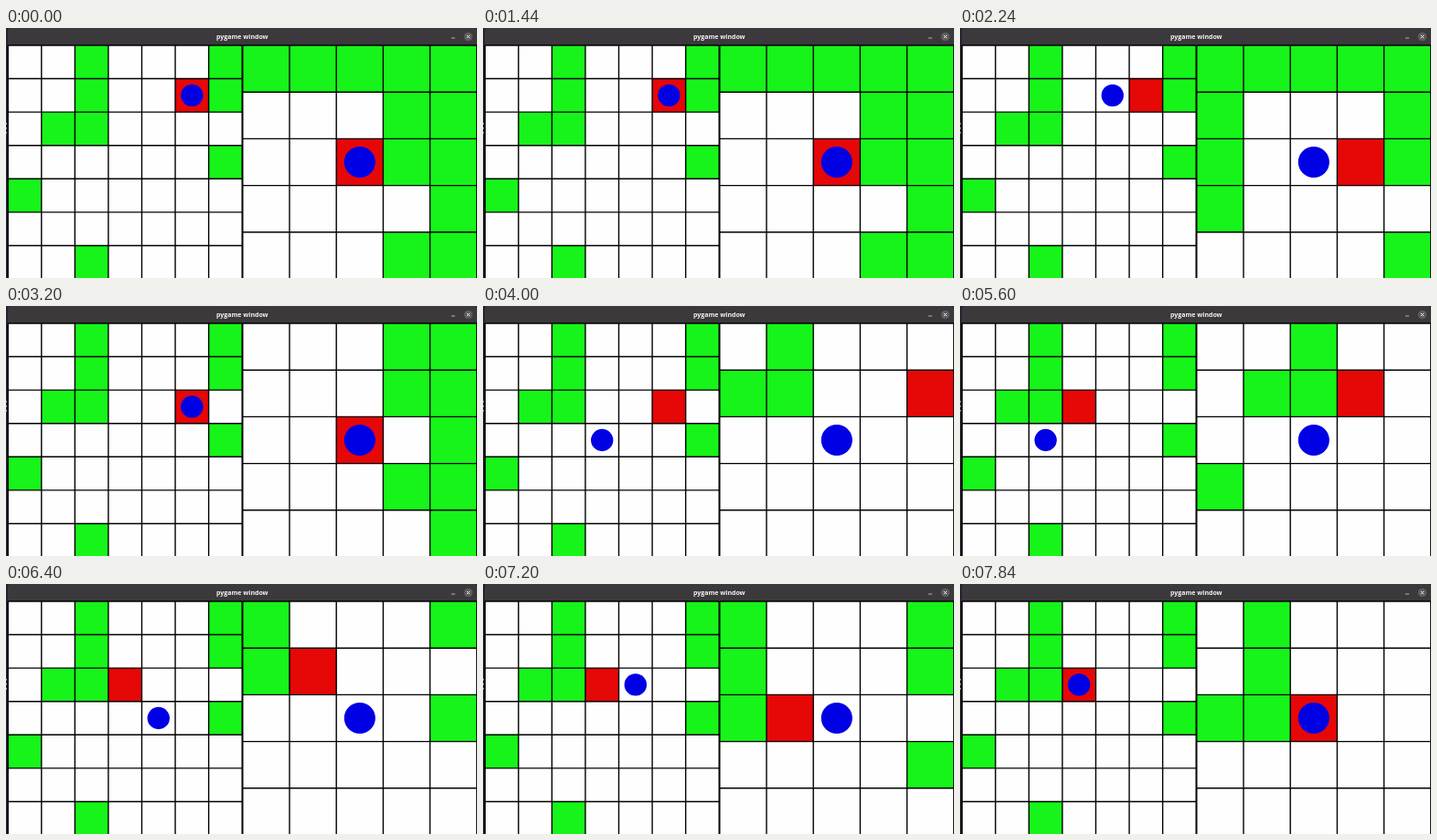
Write an HTML page with a canvas that moves like this. It is 515x274 px and loops after 8000 ms.

```html
<!DOCTYPE html>
<html lang="en">
<head>
<meta charset="utf-8">
<title>pygame window</title>
<style>
html, body { margin: 0; width: 100%; height: 100%; overflow: hidden; background: #2b2030; }
canvas { display: block; }
</style>
</head>
<body>
<canvas id="stage" width="515" height="274"></canvas>
<script>
const ctx = document.getElementById('stage').getContext('2d');
const LOOP = 8000;
const SIZE = 7;      // cells per side of the world
const VIEW = 5;      // cells per side of the agent's view
const PANEL = 256;
const TOP = 19;
const MAP_X = 2.2;
const VIEW_X = 258.8;
const COLORS = { wall: '#16f41a', goal: '#e60707', agent: '#0000e4', floor: '#fefefe' };

const walls = new Set(['2,0', '6,0', '2,1', '6,1', '1,2', '2,2', '6,3', '0,4', '2,6']);

// [tick, column, row]
const agentPath = [
  [0, 5, 1], [10, 4, 1], [13, 4, 2], [15, 5, 2],
  [18, 5, 3], [19, 4, 3], [20, 3, 3], [21, 2, 3], [22, 1, 3], [23, 0, 3],
  [26, 1, 3], [28, 2, 3], [31, 3, 3], [32, 4, 3], [35, 4, 2], [38, 3, 2]
];
const goalPath = [[0, 5, 1], [13, 5, 2], [27, 3, 2]];

// Ticks alternate between 240 ms and 160 ms.
const tickAt = ms => 2 * Math.floor(ms / 400) + (ms % 400 >= 240 ? 1 : 0);

function placeAt(path, tick) {
  const [, col, row] = path.filter(p => p[0] <= tick).pop();
  return { col, row };
}

function isWall(col, row) {
  const outside = col < 0 || row < 0 || col >= SIZE || row >= SIZE;
  return outside || walls.has(col + ',' + row);
}

function disc(x, y, r, color) {
  ctx.fillStyle = color;
  ctx.beginPath();
  ctx.arc(x, y, r, 0, Math.PI * 2);
  ctx.fill();
}

function line(x1, y1, x2, y2) {
  ctx.beginPath();
  ctx.moveTo(x1, y1);
  ctx.lineTo(x2, y2);
  ctx.stroke();
}

// Draws count x count cells, the first of them at world cell (col0, row0).
function drawGrid(x0, count, col0, row0, agent, goal) {
  const cell = PANEL / count;
  for (let r = 0; r < count; r++) {
    for (let c = 0; c < count; c++) {
      const col = col0 + c, row = row0 + r;
      const onGoal = col === goal.col && row === goal.row;
      ctx.fillStyle = onGoal ? COLORS.goal : isWall(col, row) ? COLORS.wall : COLORS.floor;
      ctx.fillRect(x0 + c * cell, TOP + r * cell, cell + 0.5, cell + 0.5);
    }
  }
  ctx.strokeStyle = '#000';
  ctx.lineWidth = 1.4;
  for (let i = 0; i <= count; i++) {
    const d = i * cell;
    line(x0 + d, TOP, x0 + d, TOP + PANEL);
    line(x0, TOP + d, x0 + PANEL, TOP + d);
  }
  disc(x0 + (agent.col - col0 + 0.5) * cell, TOP + (agent.row - row0 + 0.5) * cell, cell / 3, COLORS.agent);
}

function drawFrame() {
  ctx.fillStyle = '#2b2030';
  ctx.fillRect(0, 0, 515, 274);
  ctx.fillStyle = '#b8b4ba';
  for (const y of [104, 109, 114]) ctx.fillRect(0, y, 1, 1.5);

  ctx.fillStyle = '#3b393b';
  ctx.beginPath();
  ctx.roundRect(2, 0, 513, TOP, [3, 3, 0, 0]);
  ctx.fill();
  ctx.fillStyle = '#f4f4f4';
  ctx.font = 'bold 7px "Open Sans", "Noto Sans", sans-serif';
  ctx.textAlign = 'center';
  ctx.textBaseline = 'alphabetic';
  ctx.fillText('pygame window', 258.3, 12);

  ctx.fillStyle = '#b5b3b5';
  ctx.fillRect(487, 10.5, 4, 1);
  disc(505.5, 9.5, 4.8, '#5c5a5c');
  ctx.strokeStyle = '#f0f0f0';
  ctx.lineWidth = 1;
  line(503.8, 7.8, 507.2, 11.2);
  line(507.2, 7.8, 503.8, 11.2);
}

function render(now) {
  const tick = tickAt(now % LOOP);
  const agent = placeAt(agentPath, tick);
  const goal = placeAt(goalPath, tick);
  const reach = (VIEW - 1) / 2;
  drawFrame();
  drawGrid(MAP_X, SIZE, 0, 0, agent, goal);
  drawGrid(VIEW_X, VIEW, agent.col - reach, agent.row - reach, agent, goal);
}

const start = performance.now();
function loop() {
  render(performance.now() - start);
  requestAnimationFrame(loop);
}
loop();
</script>
</body>
</html>
```
